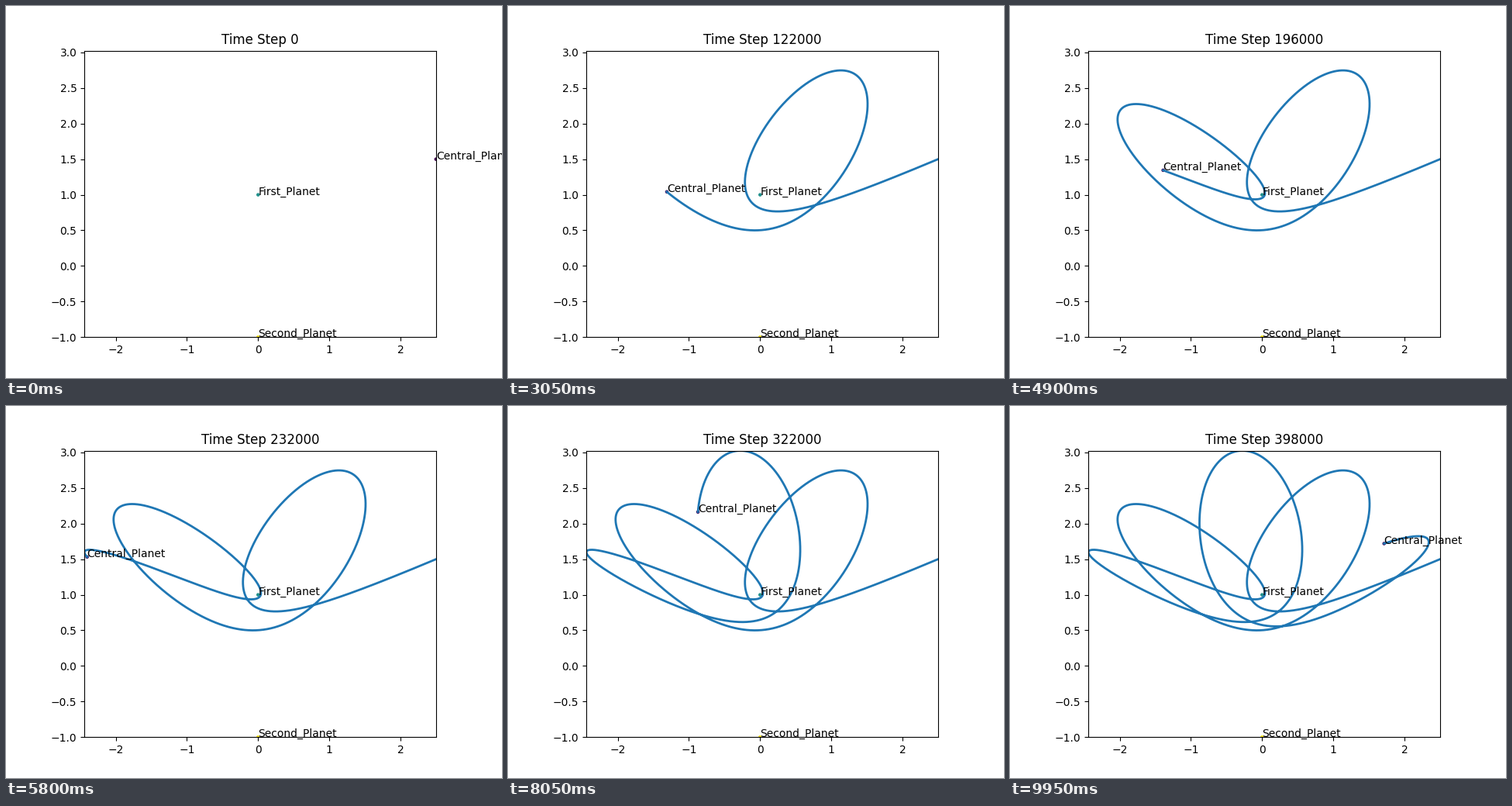
A matplotlib script that plays this animation: 640x480 px, repeating every 10 s.

```python
import numpy as np
import matplotlib.pyplot as plt
from matplotlib.animation import FuncAnimation

FRAMES = 200
STEPS_PER_FRAME = 2000
DT = 1e-4
STRIDE = 10  # simulation steps per stored point
START = (2.5, 1.5)
FIXED = [(0, 1), (0, -1)]
NAMES = ["Central_Planet", "First_Planet", "Second_Planet"]


def pull(x, y):
    """Gravity of two unit masses at (0, 1) and (0, -1)."""
    up, down = y - 1, y + 1
    k1 = (x * x + up * up) ** -1.5
    k2 = (x * x + down * down) ** -1.5
    return -x * (k1 + k2), -up * k1 - down * k2


def simulate():
    """Leapfrog path of a body released from rest."""
    x, y = START
    vx = vy = 0.0
    ax_, ay_ = pull(x, y)
    path = [(x, y)]
    for step in range(1, FRAMES * STEPS_PER_FRAME + 1):
        vx += ax_ * DT / 2
        vy += ay_ * DT / 2
        x += vx * DT
        y += vy * DT
        ax_, ay_ = pull(x, y)
        vx += ax_ * DT / 2
        vy += ay_ * DT / 2
        if step % STRIDE == 0:
            path.append((x, y))
    return np.array(path)


path = simulate()

fig, ax = plt.subplots(figsize=(6.4, 4.8), dpi=100)
ax.set_aspect("equal")
ax.set_xlim(path[:, 0].min(), path[:, 0].max())
ax.set_ylim(-1, path[:, 1].max())

places = [START] + FIXED
dots = ax.scatter(*zip(*places), c=[0, 1, 2], s=5)
labels = [ax.text(x, y, name) for (x, y), name in zip(places, NAMES)]
trail, = ax.plot([], [], lw=2)
title = ax.set_title("Time Step 0")


def draw(frame):
    step = frame * STEPS_PER_FRAME
    last = step // STRIDE
    if frame:
        trail.set_data(path[:last + 1, 0], path[:last + 1, 1])
    else:
        trail.set_data([], [])
    dots.set_offsets([tuple(path[last])] + FIXED)
    labels[0].set_position(path[last])
    title.set_text(f"Time Step {step}")
    return trail, dots, labels[0], title


anim = FuncAnimation(fig, draw, frames=FRAMES, interval=50,
                     repeat=True, repeat_delay=0, blit=False)
plt.show()
```
